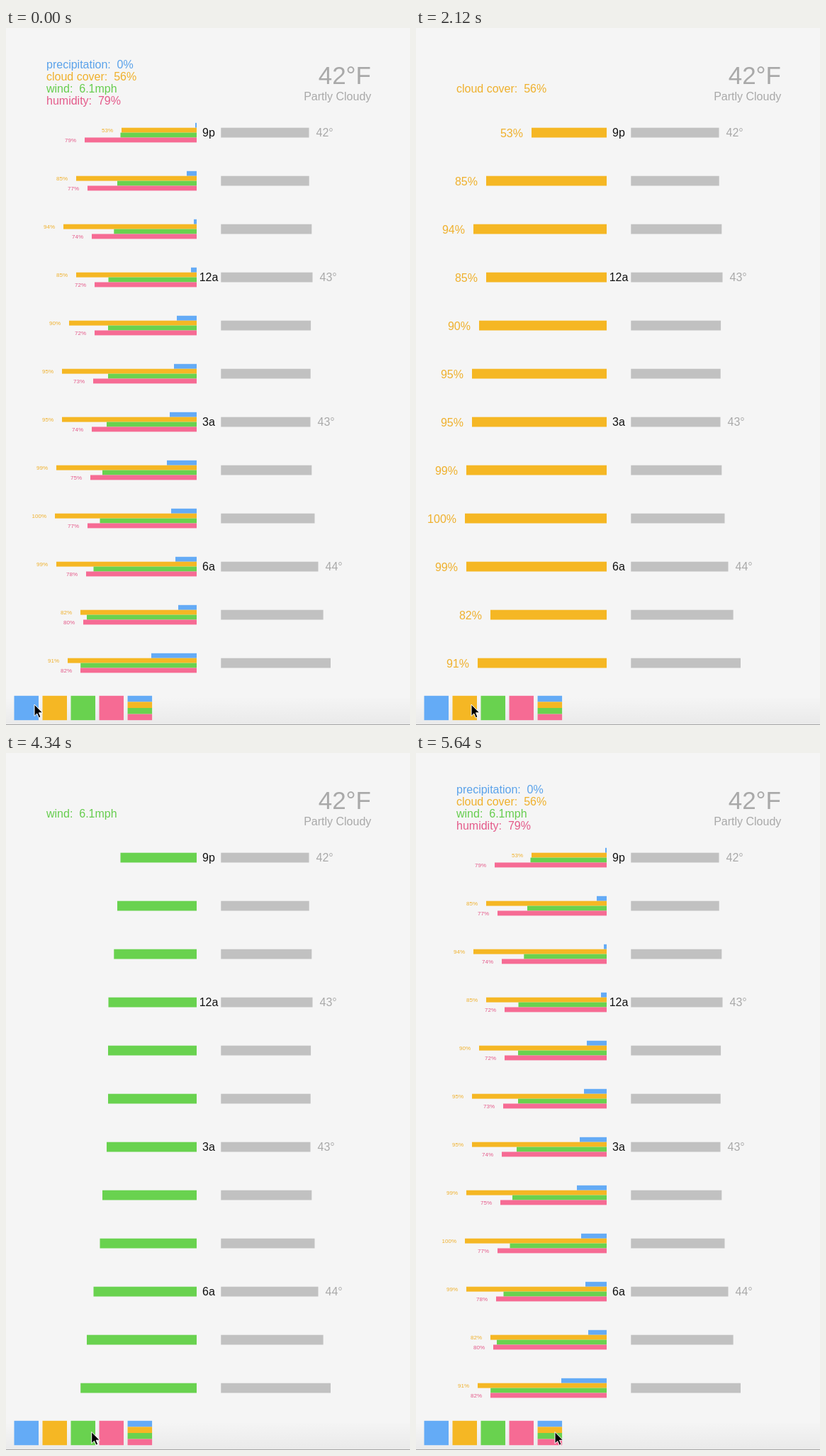
These frames come from a looping animation (570x983 px, 6.64 s). An HTML page:

```html
<!DOCTYPE html>
<html lang="en">
<head>
<meta charset="utf-8">
<title>Hourly weather</title>
<style>
  html, body { margin: 0; width: 100%; height: 100%; overflow: hidden; background: #f5f5f5; }
  svg { display: block; width: 570px; height: 983px; }
  text { font: 16px "Liberation Sans", Arial, Helvetica, sans-serif; white-space: pre; }
  .end { text-anchor: end; }
  .mid { text-anchor: middle; }
</style>
</head>
<body>
<svg id="stage" viewBox="0 0 570 983" xmlns="http://www.w3.org/2000/svg">
  <defs>
    <linearGradient id="fade" x1="0" y1="0" x2="0.1" y2="1">
      <stop offset="0" stop-color="#000" stop-opacity="0"/>
      <stop offset="1" stop-color="#000" stop-opacity=".045"/>
    </linearGradient>
  </defs>
  <rect width="570" height="983" fill="#f5f5f5"/>
  <rect y="945" width="570" height="38" fill="url(#fade)"/>
  <rect y="982" width="570" height="1" fill="#a6a6a6"/>
</svg>
<script>
const LOOP = 6640, ROW = 68, MID = 147.6, BAR = 13.8, AXIS = 269;
const GREY = '#c1c1c1', SOFT = '#a9a9a9';

const series = [
  { title: 'precipitation:  0%', fill: '#64abf6', ink: '#5aa2ea',
    widths: [2, 14, 4, 8, 28, 32, 38, 42, 36, 30, 26, 64] },
  { title: 'cloud cover:  56%', fill: '#f5b724', ink: '#efb02c',
    percent: [53, 85, 94, 85, 90, 95, 95, 99, 100, 99, 82, 91] },
  { title: 'wind:  6.1mph', fill: '#69d24f', ink: '#66cd4e',
    widths: [107.5, 112, 116.7, 124.5, 125, 125, 127, 133, 136.5, 145.5, 155, 163.8] },
  { title: 'humidity:  79%', fill: '#f66b94', ink: '#e45a8a',
    percent: [79, 77, 74, 72, 72, 73, 74, 75, 77, 78, 80, 82] }
];
const heat = [124.2, 124.4, 128, 129.2, 126.8, 126.4, 126.2, 128, 132.2, 137.2, 144.3, 154.7];
const hours = ['9p', '12a', '3a', '6a'];
const temps = ['42°', '43°', '43°', '44°'];

const stage = document.getElementById('stage');

function add(parent, tag, attrs, content) {
  const node = document.createElementNS(stage.namespaceURI, tag);
  for (const key in attrs) node.setAttribute(key, attrs[key]);
  if (content) node.textContent = content;
  return parent.appendChild(node);
}
const rect = (parent, x, y, width, height, fill) =>
  add(parent, 'rect', { x, y, width, height, fill });
const label = (parent, x, y, fill, content, cls = '', size = 16) =>
  add(parent, 'text', { x, y, fill, class: cls, style: `font-size:${size}px` }, content);

function drawSeries(parent, s, top, height, size, drop) {
  for (let i = 0; i < 12; i++) {
    const y = top + i * ROW;
    const width = s.percent ? s.percent[i] * 2 : s.widths[i];
    rect(parent, AXIS - width, y, width, height, s.fill);
    if (s.percent) label(parent, AXIS - width - 12, y + drop, s.ink, s.percent[i] + '%', 'end', size);
  }
}

// Fixed parts
label(stage, 515, 79, SOFT, '42°F', 'end', 35);
label(stage, 515.3, 102, SOFT, 'Partly Cloudy', 'end');
heat.forEach((width, i) => {
  const y = MID + i * ROW;
  rect(stage, 303.3, y - BAR / 2, width, BAR, GREY);
  if (i % 3) return;
  label(stage, 286, y + 4.9, '#111', hours[i / 3], 'mid');
  label(stage, 303.3 + width + 10, y + 4.9, SOFT, temps[i / 3]);
});
series.forEach((s, i) => {
  rect(stage, 11.5 + 40 * i, 941.8, 34.5, 34.4, s.fill);
  rect(stage, 171.6, 941.8 + 8.6 * i, 34.5, 8.6, s.fill);
});

// One view per series, then all of them together
const views = series.map(s => {
  const view = add(stage, 'g', {});
  label(view, 57, 90.6, s.ink, s.title);
  drawSeries(view, s, MID - BAR / 2, BAR, 16, 13);
  return view;
});
const together = add(stage, 'g', {});
series.forEach((s, i) => {
  label(together, 57, 56.5 + 17.1 * i, s.ink, s.title);
  drawSeries(together, s, MID - BAR + i * BAR / 2, BAR / 2, 8, 6.4);
});
views.push(together);

const pointer = add(stage, 'path', {
  d: 'M0 0V16.4L3.8 12.9L6.3 18.8L9 17.6L6.5 11.8H11.6Z',
  fill: '#000', stroke: '#fff', 'stroke-width': 1, 'stroke-linejoin': 'round'
});

// Pointer trips: start time, number of 20 ms moves, click time, goal, dip, view
const trips = [
  { start: 1000, moves: 0, click: 1000, to: [40, 954], dip: 0, view: 0 },
  { start: 2000, moves: 6, click: 2120, to: [78, 954], dip: 1.5, view: 1 },
  { start: 3120, moves: 9, click: 3320, to: [115, 954.5], dip: 1, view: 2 },
  { start: 4320, moves: 8, click: 4480, to: [146, 954.5], dip: 4, view: 3 },
  { start: 5480, moves: 8, click: 5640, to: [196, 957.5], dip: 0.5, view: 4 }
];
const ease = p => 0.3 * p + 0.7 * p * p * (3 - 2 * p);

function render(t) {
  let shown = 4, x = 40, y = 954;
  for (const trip of trips) {
    if (t < trip.start) break;
    const step = Math.floor((t - trip.start) / 20) + 1;
    const p = trip.moves ? Math.min(1, step / trip.moves) : 1;
    const e = ease(p);
    x += (trip.to[0] - x) * e;
    y += (trip.to[1] - y) * e + trip.dip * Math.sin(Math.PI * p);
    if (t >= trip.click) shown = trip.view;
  }
  views.forEach((view, i) => view.setAttribute('display', i === shown ? 'inline' : 'none'));
  pointer.setAttribute('transform', `translate(${x} ${y})`);
}

const begin = performance.now();
function tick() {
  render((performance.now() - begin) % LOOP);
  requestAnimationFrame(tick);
}
tick();
</script>
</body>
</html>
```
